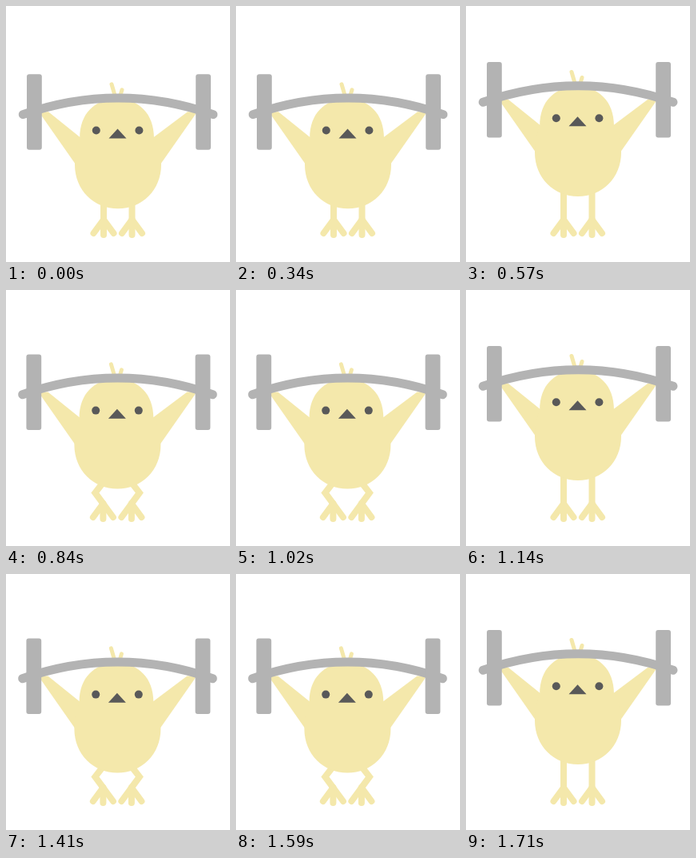
These frames come from a looping animation (280x320 px, 1.98 s). An HTML page with a canvas:

```html
<!DOCTYPE html>
<html lang="en">
<head>
<meta charset="utf-8">
<title>Chick lifting a barbell</title>
<style>
  html, body { margin: 0; width: 100%; height: 100%; overflow: hidden; background: #fff; }
  canvas { display: block; width: 280px; height: 320px; }
</style>
</head>
<body>
<canvas id="stage"></canvas>
<script>
const W = 280, H = 320, LOOP = 1980;
const YELLOW = '#f4e8ab', GREY = '#b3b3b3', DARK = '#595959';

const LOW = { dx: 0, dy: 15.3, bent: false };
const HIGH = { dx: 0, dy: 0, bent: false };
const SQUAT = { dx: -0.6, dy: 10.4, bent: true };

// Each pose holds until its end time, then snaps to the next.
const TIMELINE = [
  [570, LOW], [840, HIGH], [1140, SQUAT],
  [1410, HIGH], [1710, SQUAT], [LOOP, HIGH]
];

const canvas = document.getElementById('stage');
const ctx = canvas.getContext('2d');
const ratio = window.devicePixelRatio || 1;
canvas.width = W * ratio;
canvas.height = H * ratio;

function line(points, width, color) {
  ctx.beginPath();
  points.forEach(([x, y]) => ctx.lineTo(x, y));
  ctx.lineWidth = width;
  ctx.strokeStyle = color;
  ctx.stroke();
}

function polygon(points, color) {
  ctx.beginPath();
  points.forEach(([x, y]) => ctx.lineTo(x, y));
  ctx.fillStyle = color;
  ctx.fill();
}

function dot(x, y, r) {
  ctx.beginPath();
  ctx.arc(x, y, r, 0, Math.PI * 2);
  ctx.fillStyle = DARK;
  ctx.fill();
}

function plate(x) {
  ctx.beginPath();
  ctx.roundRect(x, 70, 18.8, 94.5, 3);
  ctx.fillStyle = GREY;
  ctx.fill();
}

// side is -1 for the left leg and 1 for the right one
function leg(x, side, pose) {
  const ankle = [x, 267];
  ctx.lineJoin = 'miter';
  if (pose.bent) {
    line([[x + side, 242], [x + side * 10, 253.5], ankle], 8, YELLOW);
  } else {
    line([[x, 225], ankle], 8, YELLOW);
  }
  ctx.lineJoin = 'round';
  line([[x - 12.5, 284], ankle, [x + 12.5, 284]], 8, YELLOW);
  line([ankle, [x, 286]], 8, YELLOW);
}

function body() {
  line([[132, 82.5], [136.5, 98]], 5, YELLOW);
  line([[145, 89.5], [142.5, 98]], 5, YELLOW);

  polygon([[41, 117], [53, 117], [94, 150], [98, 186], [86.5, 182]], YELLOW);
  polygon([[239, 117], [227, 117], [183, 150], [181, 186], [193.5, 182]], YELLOW);

  ctx.beginPath();
  ctx.moveTo(92.2, 150);
  ctx.bezierCurveTo(92.2, 119, 111, 101, 138.6, 101);
  ctx.bezierCurveTo(166, 101, 185, 119, 185, 150);
  ctx.bezierCurveTo(190.5, 160, 194, 170, 194, 183);
  ctx.bezierCurveTo(194, 215, 170, 238, 140, 238);
  ctx.bezierCurveTo(110, 238, 86, 215, 86, 183);
  ctx.bezierCurveTo(86, 170, 88, 160, 92.2, 150);
  ctx.fillStyle = YELLOW;
  ctx.fill();

  dot(112.8, 140.2, 5);
  dot(166.4, 140.2, 5);
  polygon([[128.5, 150.3], [139.5, 138.3], [150.5, 150.3]], DARK);
}

function barbell() {
  ctx.beginPath();
  ctx.moveTo(21.2, 120.3);
  ctx.quadraticCurveTo(140, 79, 259, 120.3);
  ctx.lineWidth = 11;
  ctx.strokeStyle = GREY;
  ctx.stroke();
  plate(26);
  plate(237.2);
}

function draw(now) {
  const t = now % LOOP;
  const pose = TIMELINE.find(([end]) => t < end)[1];

  ctx.setTransform(ratio, 0, 0, ratio, 0, 0);
  ctx.fillStyle = '#fff';
  ctx.fillRect(0, 0, W, H);
  ctx.lineCap = 'round';

  ctx.translate(pose.dx, 0);
  leg(122, -1, pose);
  leg(157.5, 1, pose);
  ctx.translate(0, pose.dy);
  body();
  barbell();
}

const start = performance.now();
function tick() {
  draw(performance.now() - start);
  requestAnimationFrame(tick);
}
tick();
</script>
</body>
</html>
```
